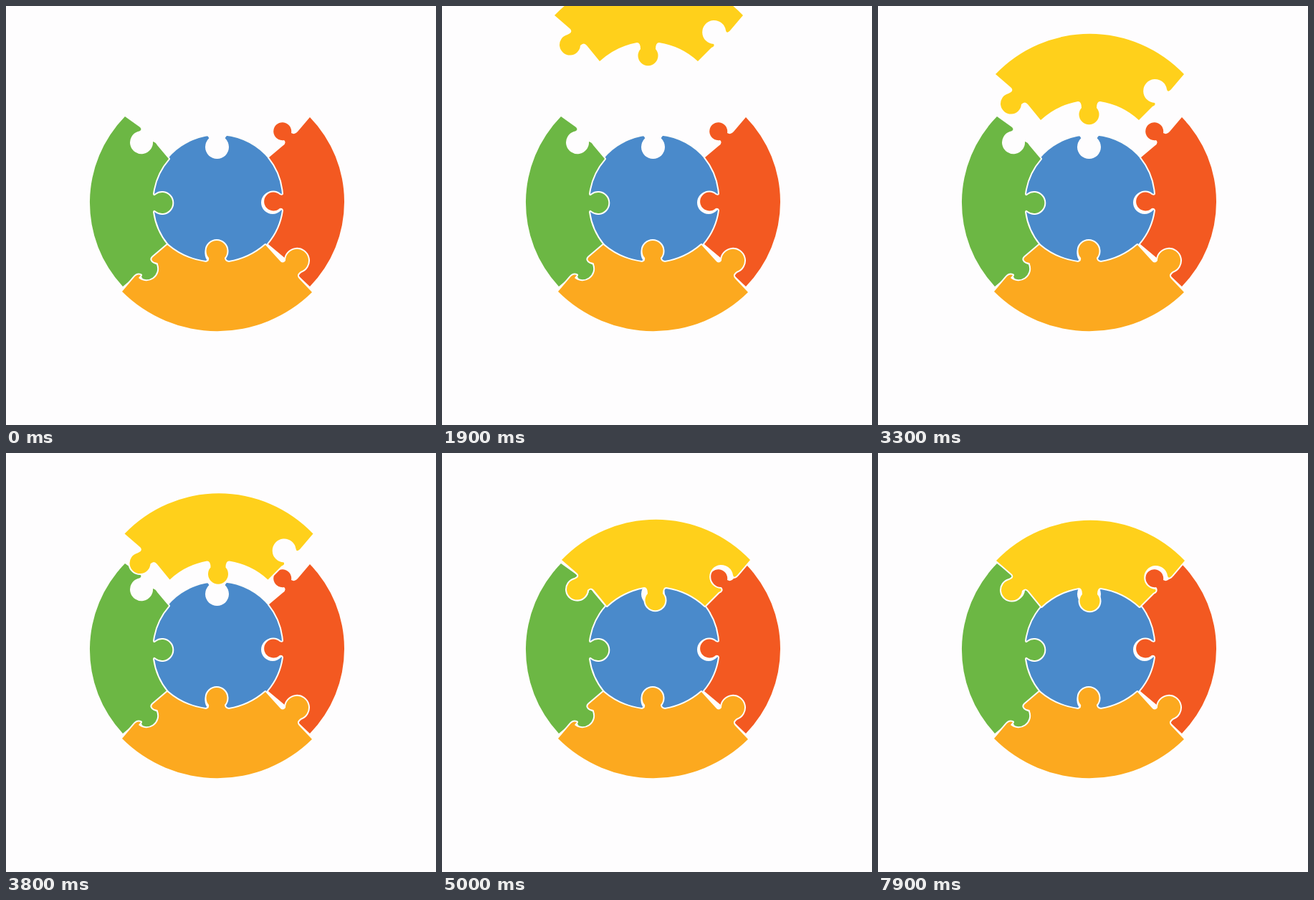
These frames come from a looping animation (600 by 584 pixels, 8 s). An HTML page:

```html
<!DOCTYPE html>
<html lang="en">
<head>
<meta charset="utf-8">
<title>Round puzzle</title>
<style>
  html, body { margin: 0; width: 100%; height: 100%; overflow: hidden; background: #fefdfe; }
  svg { display: block; width: 600px; height: 584px; }
  .piece { stroke: #fffefb; stroke-width: 4; stroke-linejoin: round; paint-order: stroke; }
  .gap { fill: #fefdfe; }
</style>
</head>
<body>
<svg viewBox="0 0 600 584">
  <circle class="piece" cx="296" cy="272" r="92" fill="#4a8acb"/>

  <!-- sockets in the centre piece -->
  <g class="gap">
    <circle cx="294.5" cy="196.5" r="16.5"/>
    <path d="M277 178 Q284 182 284 187 H305 Q305 182 312 178Z"/>
    <circle cx="372" cy="274" r="16"/>
    <circle cx="293" cy="345" r="15.5"/>
  </g>

  <!-- left -->
  <path class="piece" fill="#6cb744" d="M166 154 L187 169 Q191 173 184 175
    A16 16 0 1 0 205 189 Q209 190 211 194 L227 213
    A92 92 0 0 0 205 262 Q206 266 209 263 A14.5 14.5 0 1 1 209 286 Q206 283 205 287
    A92 92 0 0 0 225 333 L204 351 Q200 355 207 359
    A14.5 14.5 0 1 1 190 379 Q187 372 181 376 L163 391 A171.5 171.5 0 0 1 166 154Z"/>

  <!-- right -->
  <path class="piece" fill="#f35921" d="M424 155 L407 175 Q403 180 398 177
    A12.5 12.5 0 1 0 388 187 Q392 191 386 195 L367 211
    A92 92 0 0 1 387 262 Q386 265 382 263 A13 13 0 1 0 382 282 Q386 281 387 285
    A92 92 0 0 1 366 332 L390 352 L407 375 L424 391 A169 169 0 0 0 424 155Z"/>

  <!-- bottom -->
  <path class="piece" fill="#fca91f" d="M162 398 L179 378 Q183 373 188 375 L185 379
    A17 17 0 0 0 212 360 Q213 358 207 357 Q201 354 205 350 L225 333
    A104 104 0 0 0 279 357 Q284 356 283 351 A14.5 14.5 0 1 1 305 351 Q305 356 311 357
    A104 104 0 0 0 362 333 L382 355 Q386 360 390 355
    A16 16 0 1 1 411 370 Q404 375 409 380 L427 399 A188 188 0 0 1 162 398Z"/>

  <!-- top, falls into place -->
  <path id="top" class="piece" fill="#ffd01b" d="M165 150 A182 182 0 0 1 428 150 L411 170 Q405 177 404 171
    A16.5 16.5 0 1 0 387 190 Q389 193 384 195 L365 214
    A103 103 0 0 0 311 188 Q306 188 306 197 A14 14 0 1 1 285 197 Q285 188 280 188
    A103 103 0 0 0 228 214 L210 192 Q206 187 201 192
    A14.5 14.5 0 1 1 183 177 Q191 174 187 169Z"/>
</svg>
<script>
  const LOOP = 8000, STEP = 100;
  // time, x offset, y offset from the resting place
  const path = [
    [0, -18, -262], [1900, -8, -137], [2700, -4, -85], [3300, -1, -55], [3600, 0, -45],
    [4400, 2, -15], [5000, 2, -1], [5400, 2, 0], [6400, 0, 0], [LOOP, 0, 0]
  ];
  const topPiece = document.getElementById('top');

  function offsetAt(t) {
    const i = path.findIndex(key => key[0] > t);
    const a = path[i - 1], b = path[i];
    const k = (t - a[0]) / (b[0] - a[0]);
    return [1, 2].map(n => a[n] + (b[n] - a[n]) * k);
  }

  function draw() {
    const t = Math.floor(performance.now() % LOOP / STEP) * STEP;
    topPiece.setAttribute('transform', `translate(${offsetAt(t)})`);
    requestAnimationFrame(draw);
  }
  draw();
</script>
</body>
</html>
```
